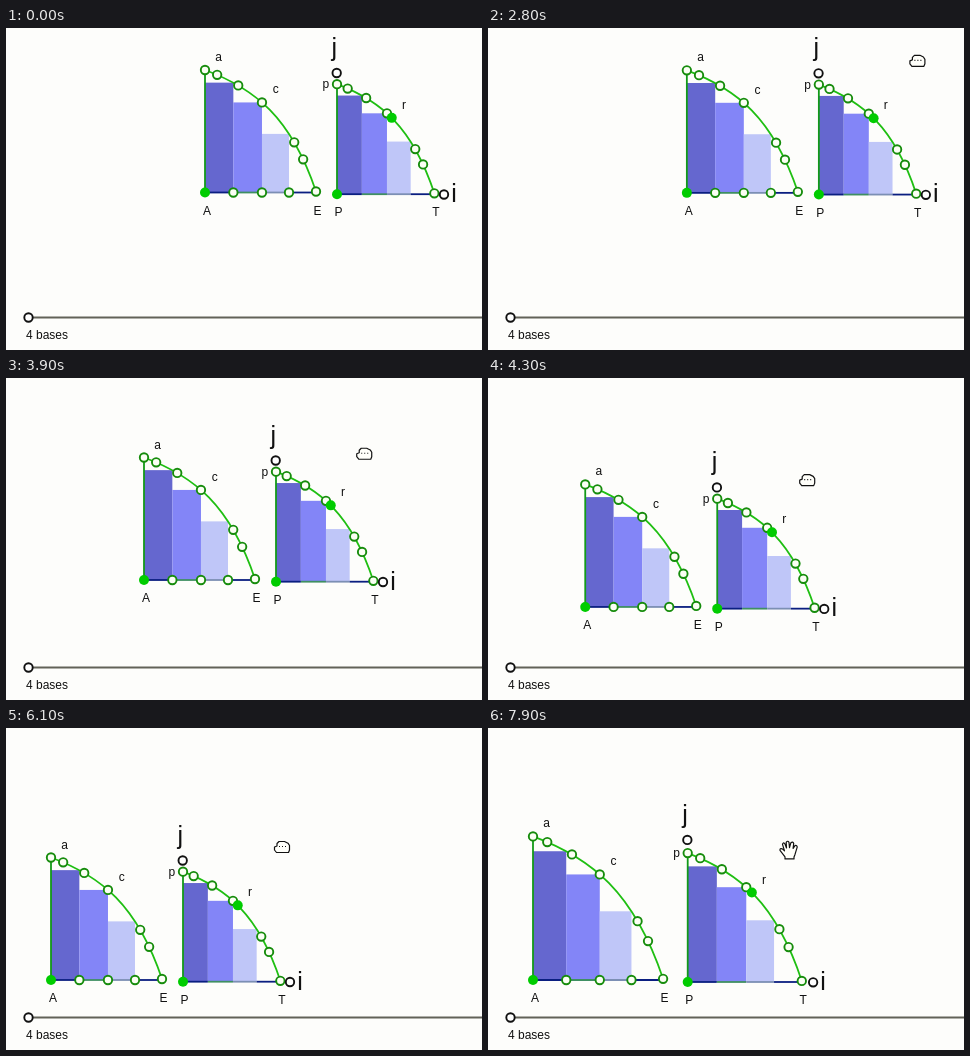
Animation of 476x322 px, one loop 8 s. Source, as an HTML page:

```html
<!DOCTYPE html>
<html lang="en">
<head>
<meta charset="utf-8">
<title>Area under two curves</title>
<style>
  html, body { margin: 0; width: 100%; height: 100%; overflow: hidden; background: #fdfdfb; }
  svg { display: block; width: 476px; height: 322px; }
  text { font: 12px "Liberation Sans", Arial, sans-serif; fill: #111; }
  .mid { text-anchor: middle; }
  .big { font-size: 25px; }
  path, line { fill: none; stroke-width: 1.8; vector-effect: non-scaling-stroke; }
  .curve { stroke: #1fbf12; }
  .side { stroke: #129a18; }
  .ring { fill: #fbfff4; stroke: #168c0c; stroke-width: 1.9; }
  .dot { fill: #0c0; }
  .unit { fill: #fff; stroke: #111; stroke-width: 1.9; }
  .cursor path { fill: #fffffa; stroke: #111; stroke-width: 1.2; stroke-linejoin: round; }
  .cursor .knuckles { stroke-dasharray: 1 2; }
</style>
</head>
<body>
<svg viewBox="0 0 476 322">
  <line x1="22" y1="289.5" x2="476" y2="289.5" stroke="#626258"/>
  <circle class="unit" cx="22.5" cy="289.5" r="4.2"/>
  <text x="20" y="311">4 bases</text>
  <g id="shapes"></g>
  <g id="marks"></g>
  <g id="arrow" class="cursor"><path d="M0 0V14L3.3 11.2L6 17L8.6 15.8L6 10.2H10.5Z"/></g>
  <g id="fist" class="cursor">
    <path d="M-5.5 5.5L-7.5 3V0L-5 -1V-3.5L-3 -5.5H2.5L6 -3.8L7.5 -1.5V3L6.5 5.5Z"/>
    <path class="knuckles" d="M-3 -.5H6"/>
  </g>
  <g id="palm" class="cursor">
    <path d="M-3.5 9V7L-8.5 .5Q-8.8 -2 -6.2 -1L-4 1L-6 -5.5Q-5.6 -8 -3.7 -6.3L-2 -2L-2.3 -7.5Q-.8 -9.8 .5 -7.5L1 -2.2L2.4 -7.2Q4.3 -8.8 5.2 -6.4L4.6 -1.5L6.5 -4.3Q8.6 -5 8.7 -2.8L6.5 4.5L5.5 7V9Z"/>
  </g>
</svg>
<script>
const LOOP = 8000, STEP = 100;
const byId = id => document.getElementById(id);
const shapes = byId('shapes'), marks = byId('marks');
const placed = [];

function add(parent, tag, attrs, text) {
  const el = document.createElementNS('http://www.w3.org/2000/svg', tag);
  for (const k in attrs) el.setAttribute(k, attrs[k]);
  if (text) el.textContent = text;
  parent.appendChild(el);
  return el;
}

// Marks follow the scaled figure but keep their own size.
const mark = ([x, y], cls, r = 4.2) =>
  placed.push({ el: add(marks, 'circle', { class: cls, r }), x, y });
const label = (text, [x, y], dx, dy, cls = '') =>
  placed.push({ el: add(marks, 'text', { class: 'mid ' + cls, x: dx, y: dy }, text), x, y });

// Both figures share one Bezier arc, in coordinates relative to point A.
const ARC = [[0, -122.5], [50, -104], [86, -75], [111, -1]];
const RINGS = [0, .083, .237, .43, .74, .84, 1];
const BARS = [.2, .43, .685];
const FILLS = ['#6567cf', '#8385f7', '#bfc6f8'];
const BASES = ['#0a1e80', '#3f8f62', '#7c8fb4', '#0a1e80'];

function arc(t) {
  const u = 1 - t, w = [u * u * u, 3 * u * u * t, 3 * u * t * t, t * t * t];
  return [0, 1].map(k => ARC.reduce((sum, p, i) => sum + p[k] * w[i], 0));
}

// Draws one figure and returns a function giving points on its arc.
function figure(x, y, kx, ky) {
  const g = add(shapes, 'g', { transform: `translate(${x} ${y}) scale(${kx} ${ky})` });
  const on = t => { const [px, py] = arc(t); return [x + px * kx, y + py * ky]; };
  const ends = [0, ...[...BARS, 1].map(t => arc(t)[0])];
  BARS.forEach((t, i) => {
    const h = -arc(t)[1];
    add(g, 'rect', { x: ends[i], y: -h, width: ends[i + 1] - ends[i], height: h, fill: FILLS[i] });
  });
  BASES.forEach((stroke, i) =>
    add(g, 'line', { x1: ends[i], x2: ends[i + 1], y1: 0, y2: 0, stroke }));
  add(g, 'line', { class: 'side', x1: 0, y1: 0, x2: 0, y2: ARC[0][1] });
  add(g, 'path', { class: 'curve', d: `M${ARC[0]}C${ARC.slice(1).join(' ')}` });
  RINGS.forEach(t => mark(on(t), 'ring'));
  mark([x, y], 'dot', 5);
  return on;
}

const A = [0, 0], P = [132, 1.7], I = [239, 2], J = [131.7, -119.5];
const left = figure(...A, 1, 1);
BARS.forEach(t => mark([left(t)[0], 0], 'ring'));
const right = figure(...P, .877, .898);
const R = right(.478);
mark(R, 'dot', 5);
mark(J, 'unit');
mark(I, 'unit');

label('a', left(0), 13.7, -9);
label('c', left(.43), 13.7, -9);
label('A', A, 2, 22.3);
label('E', [111, 0], 1.5, 22.3);
label('p', right(0), -11.2, 4);
label('r', R, 12.2, -9);
label('P', P, 1.5, 22);
label('T', [229.3, 1.7], 1.5, 22);
label('j', J, -2.3, -17, 'big');
label('i', I, 10, 7.5, 'big');

// Key points of the drag: time, x and y of point A.
const DRAG = [[2700, 199, 164.5], [3300, 194, 172], [3600, 185, 177],
  [3900, 138, 202], [4700, 65, 249.8], [5300, 45, 252]];

const span = (t, a, b) => Math.min(1, Math.max(0, (t - a) / (b - a)));
const mix = (a, b, u) => a.map((v, k) => v + (b[k] - v) * u);

// Smooth (Hermite) motion through the key points, at rest at both ends.
function anchor(t) {
  const last = DRAG.length - 1;
  let i = 0;
  while (i < last - 1 && t >= DRAG[i + 1][0]) i++;
  const a = DRAG[i], b = DRAG[i + 1], d = b[0] - a[0], u = span(t, a[0], b[0]);
  const slope = (n, k) => n === 0 || n === last ? 0 :
    (DRAG[n + 1][k] - DRAG[n - 1][k]) / (DRAG[n + 1][0] - DRAG[n - 1][0]);
  return [1, 2].map(k => a[k] + (b[k] - a[k]) * u * u * (3 - 2 * u)
    + d * u * (1 - u) * (slope(i, k) * (1 - u) - slope(i + 1, k) * u));
}

const zoom = t => 1 + .172 * span(t, 6500, 7900) ** 3;

// The hand runs one step ahead of the figure it drags.
function pointer(t) {
  const [x, y] = anchor(t + STEP), s = zoom(t);
  const grip = mix([231, -133], [218, -111], span(t, 6100, 6500));
  const entry = 1 - span(t, 1200, 1700);
  return [x + grip[0] * s - 37 * entry, y + grip[1] * s - 40.5 * entry];
}

function cursorAt(t) {
  if (t < 1200) return '';
  if (t < 1600) return 'arrow';
  const dragging = t >= 2800 && t < 6200, zooming = t >= 6600 && t < 7900;
  return dragging || zooming ? 'fist' : 'palm';
}

function draw(t) {
  const [ax, ay] = anchor(t), s = zoom(t), shown = cursorAt(t);
  const move = (x, y) => `translate(${x.toFixed(2)} ${y.toFixed(2)})`;
  shapes.setAttribute('transform', `${move(ax, ay)} scale(${s})`);
  placed.forEach(m => m.el.setAttribute('transform', move(ax + m.x * s, ay + m.y * s)));
  for (const id of ['arrow', 'fist', 'palm']) {
    byId(id).setAttribute('display', id === shown ? 'inline' : 'none');
    byId(id).setAttribute('transform', move(...pointer(t)));
  }
}

const start = performance.now();
function tick() {
  const t = (performance.now() - start) % LOOP;
  draw(Math.floor(t / STEP) * STEP);
  requestAnimationFrame(tick);
}
tick();
</script>
</body>
</html>
```
